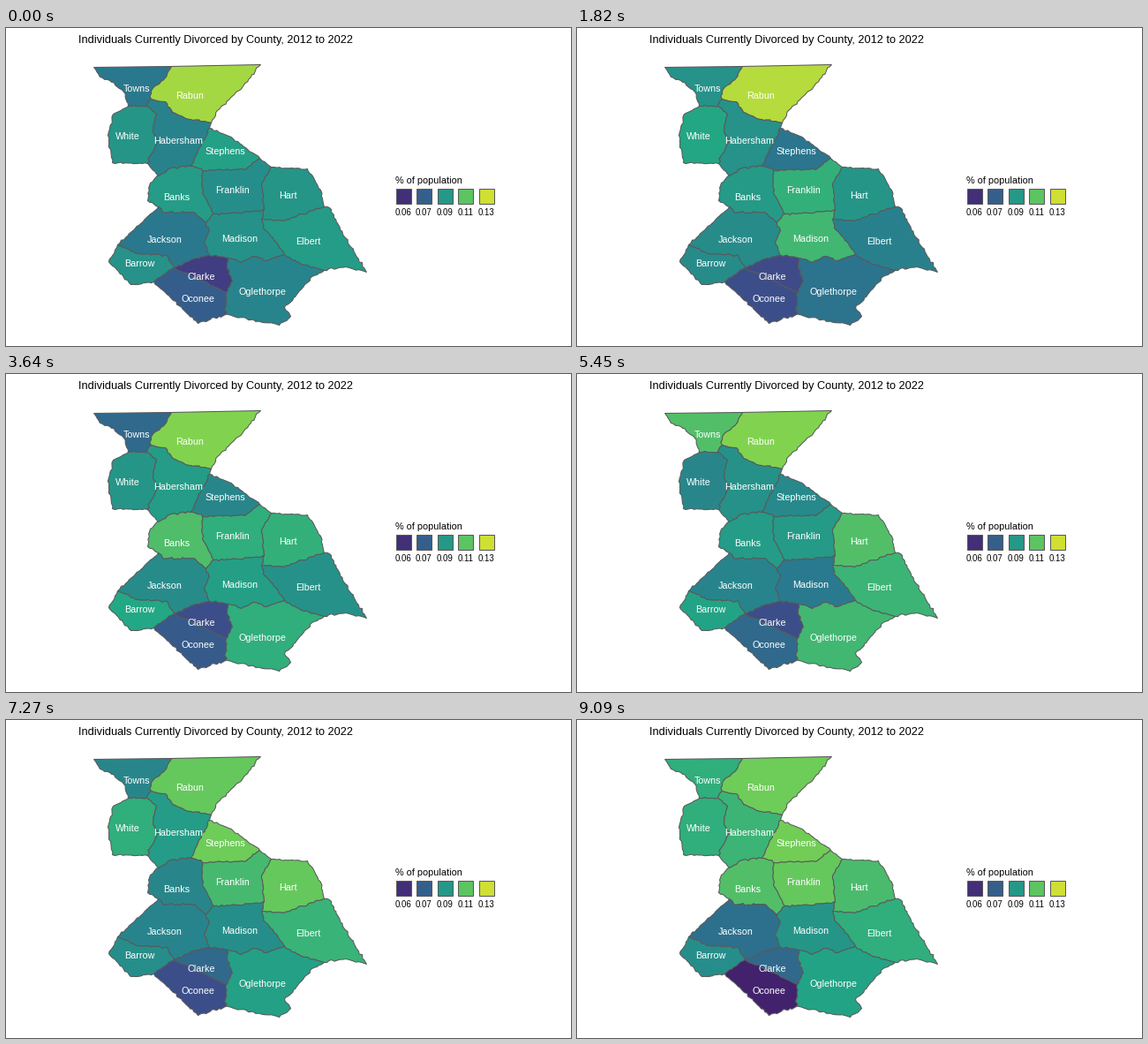
A matplotlib script that plays this animation: 640x360 px, repeating every 10 s.

```python
import numpy as np
import matplotlib.pyplot as plt
from matplotlib.animation import FuncAnimation
from matplotlib.colors import LinearSegmentedColormap
from matplotlib.patches import Polygon, Rectangle

YEARS, FRAMES, STEP = 11, 200, 50
EDGE = dict(ec="#595959", lw=0.75)
rng = np.random.default_rng(7)

# Straight blends between six viridis tones
tones = plt.get_cmap("viridis")(np.linspace(0, 1, 6))
cmap = LinearSegmentedColormap.from_list("tones", tones)

plt.rcParams["font.family"] = "Liberation Sans"
fig = plt.figure(figsize=(6.4, 3.6), dpi=100, facecolor="white")
ax = fig.add_axes([0, 0, 1, 1])
ax.set_xlim(0.5, 640.5)
ax.set_ylim(360.5, 0.5)
ax.axis("off")

# Corners where borders meet, and the main bends of the borders between them
nodes = {
    "A": (188, 44), "B": (165, 81), "C": (160, 89), "D": (139, 89),
    "E": (161, 154), "F": (233, 108), "G": (231, 114), "H": (210, 157),
    "I": (173, 168), "J": (223, 162), "K": (288, 148), "L": (301, 158),
    "M": (236, 211), "N": (227, 221), "O": (173, 203), "P": (293, 206),
    "Q": (290, 217), "R": (361, 203), "S": (316, 257), "T": (361, 275),
    "U": (231, 258), "V": (252, 261), "W": (191, 272), "X": (127, 246),
    "Y": (168, 288), "Z": (250, 300), "a": (249, 325),
}
bends = {
    "AB": [(181, 57), (165, 72)],
    "DA": [(134, 73), (118, 60), (107, 56), (100, 45)],
    "AF": [(289, 42), (268, 68), (240, 94)],
    "FB": [(204, 103), (189, 96), (181, 84)],
    "DE": [(122, 98), (116, 122), (121, 153)],
    "CE": [(171, 98), (167, 117), (172, 130)],
    "GH": [(218, 140)],
    "HI": [(188, 159)],
    "GK": [(258, 126)],
    "JK": [(271, 161)],
    "JM": [(223, 187)],
    "NO": [(212, 209), (180, 210)],
    "OI": [(161, 196), (164, 176)],
    "LP": [(290, 177)],
    "PM": [(269, 210)],
    "LR": [(342, 160), (357, 184)],
    "QR": [(315, 219)],
    "QS": [(292, 227), (303, 238)],
    "RT": [(367, 204), (382, 234), (409, 277), (385, 271)],
    "ST": [(335, 268)],
    "SV": [(295, 264), (284, 259), (267, 266)],
    "NU": [(231, 230), (225, 243)],
    "UW": [(210, 263)],
    "XW": [(150, 256), (183, 258)],
    "XY": [(117, 265), (142, 291)],
    "VZ": [(251, 270), (257, 287)],
    "Ya": [(190, 309), (218, 335)],
    "aT": [(310, 337), (323, 327), (316, 317), (328, 305), (345, 284)],
}
lines = {}


def rough_line(pts):
    """Join points like a river bank; very long runs stay straight."""
    out = [pts[0]]
    for p, q in zip(pts, pts[1:]):
        length = np.hypot(*(q - p))
        n = max(1, round(length / 3)) if length < 80 else 1
        t = np.linspace(0, 1, n + 1)[1:, None]
        noise = rng.normal(0, 0.6, (n, 2))
        noise[-1] = 0
        out.extend(p + (q - p) * t + noise)
    return np.array(out)


def border(a, b):
    if a + b not in lines:
        key = a + b if b + a not in bends else b + a
        pts = [nodes[key[0]], *bends.get(key, []), nodes[key[1]]]
        lines[key] = rough_line(np.array(pts, float))
        lines[key[::-1]] = lines[key][::-1]
    return lines[a + b]


def write(x, y, s, px, color="black", ha="left"):
    ax.text(x, y, s, fontsize=px * 0.72, color=color, ha=ha, va="baseline")


# name: ring of corners, label centre, shade in percent in the key years
KEYS = [0, 2, 4, 6, 7, 8, 10]
counties = {
    "Towns": ("ABCDA", 149, 68, [40, 51, 34, 71, 51, 46, 63]),
    "Rabun": ("AFBA", 208.5, 76.5, [86, 89, 81, 81, 78, 75, 77]),
    "White": ("CEDC", 138.5, 122.5, [52, 59, 52, 46, 53, 63, 63]),
    "Habersham": ("BFGHIECB", 195.5, 127.5, [44, 51, 55, 50, 59, 55, 66]),
    "Stephens": ("GKJHG", 249, 139.5, [57, 39, 46, 47, 50, 77, 78]),
    "Banks": ("IHJMNOI", 194, 191.5, [55, 54, 70, 55, 59, 46, 71]),
    "Franklin": ("JKLPMJ", 256.5, 183.5, [49, 64, 63, 54, 54, 68, 75]),
    "Hart": ("LRQPL", 320, 189.5, [52, 52, 64, 71, 75, 75, 69]),
    "Jackson": ("ONUWXO", 180, 239.5, [40, 48, 48, 45, 48, 45, 37]),
    "Madison": ("MPQSVUNM", 265, 238.5, [50, 67, 56, 41, 40, 49, 52]),
    "Elbert": ("RTSQR", 342.5, 241.5, [55, 43, 50, 66, 77, 65, 63]),
    "Barrow": ("XWYX", 151.5, 266.5, [51, 48, 60, 58, 57, 49, 49]),
    "Clarke": ("WUVZW", 222, 281.5, [18, 23, 24, 24, 23, 34, 34]),
    "Oconee": ("WZaYW", 218, 306.5, [30, 24, 29, 34, 37, 24, 10]),
    "Oglethorpe": ("VSTaZV", 290.5, 298.5, [45, 38, 63, 67, 70, 57, 58]),
}

areas = []
for name, (ring, x, y, shades) in counties.items():
    outline = np.vstack([border(a, b)[:-1] for a, b in zip(ring, ring[1:])])
    area = ax.add_patch(Polygon(outline, closed=True, **EDGE))
    colors = cmap(np.interp(range(YEARS), KEYS, shades) / 100)
    areas.append((area, colors))
    write(x, y + 4, name, 10.8, "white", "center")

write(83, 17.6, "Individuals Currently Divorced by County, 2012 to 2022", 12.8)
write(441.5, 176.5, "% of population", 10.9)
for i, label in enumerate(["0.06", "0.07", "0.09", "0.11", "0.13"]):
    x = 442 + 23.5 * i
    shade = 0.14 + 0.197 * i - 0.03 * (i == 1)
    ax.add_patch(Rectangle((x, 182), 17, 17, fc=cmap(shade), **EDGE))
    write(x + 8.5, 213, label, 9.6, ha="center")


def update(frame):
    # A year starts with the step its first moment falls in
    year = (frame * YEARS + YEARS - 1) // FRAMES
    for area, colors in areas:
        area.set_facecolor(colors[year])
    return [area for area, _ in areas]


anim = FuncAnimation(fig, update, frames=FRAMES, interval=STEP,
                     repeat=True, repeat_delay=0, blit=False)
plt.show()
```
